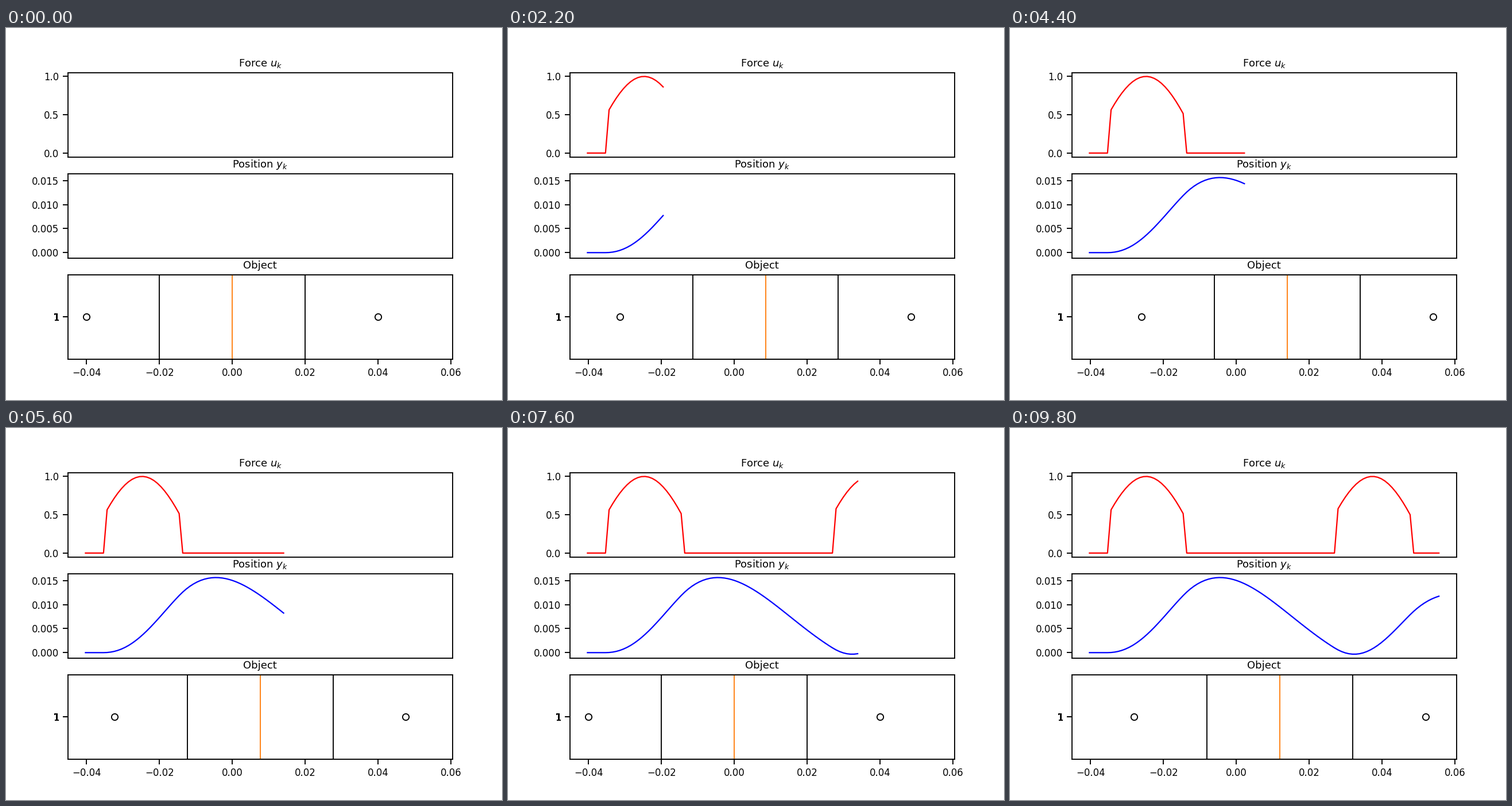
These frames come from a looping animation (864x648 px, 10 s). A matplotlib script:

```python
import numpy as np
import matplotlib.pyplot as plt
from matplotlib.animation import ArtistAnimation

plt.rcParams.update({
    "font.family": "DejaVu Sans",
    "font.size": 9.6,
    "axes.titlesize": 9.6,
    "axes.linewidth": 1.0,
    "lines.linewidth": 1.2,
    "xtick.labelsize": 8.8,
    "ytick.labelsize": 8.8,
    "xtick.major.size": 4.8,
    "ytick.major.size": 4.8,
    "xtick.major.width": 1.0,
    "ytick.major.width": 1.0,
})

FRAMES = 50
STRIDE = 2
DT = 0.1
MASS, DAMPING, SPRING = 100.0, 50.0, 40.0


def rate(state, force):
    pos, vel = state
    return np.array([vel, (force - DAMPING * vel - SPRING * pos) / MASS])


def step(state, force):
    """Advance the damped spring by one RK4 step with constant force."""
    a = rate(state, force)
    b = rate(state + DT / 2 * a, force)
    c = rate(state + DT / 2 * b, force)
    d = rate(state + DT * c, force)
    return state + DT / 6 * (a + 2 * b + 2 * c + d)


def simulate(count):
    wave = np.sin(DT * np.arange(count))
    force = np.where(wave > 0.5, wave, 0.0)
    state = np.zeros(2)
    position = []
    for u in force:
        state = step(state, u)
        position.append(state[0])
    return force, np.array(position)


def draw_object(ax, x):
    stats = dict(label="1", med=x, q1=x - 0.02, q3=x + 0.02,
                 whislo=x - 0.02, whishi=x + 0.02,
                 fliers=[x - 0.04, x + 0.04])
    parts = ax.bxp([stats], vert=False, widths=1, showcaps=False)
    return [artist for group in parts.values() for artist in group]


force, position = simulate(STRIDE * FRAMES)

fig, (ax_u, ax_y, ax_obj) = plt.subplots(3, 1, figsize=(6.4, 4.8), dpi=135)
ax_u.set_title("Force $u_k$")
ax_y.set_title("Position $y_k$")
ax_obj.set_title("Object")

scenes = []
for k in range(FRAMES):
    n = STRIDE * k
    t = np.arange(n)
    scene = ax_u.plot(t, force[:n], color="red")
    scene += ax_y.plot(t, position[:n], color="blue")
    scene += draw_object(ax_obj, position[n])
    scenes.append(scene)

for ax in (ax_u, ax_y):
    ax.set_xticks([])
ax_u.set_yticks([0, 0.5, 1])
ax_y.set_yticks([0, 0.005, 0.01, 0.015])
ax_obj.set_xticks(np.arange(-2, 4) * 0.02)

ani = ArtistAnimation(fig, scenes, interval=200, repeat=True)
plt.show()
```
